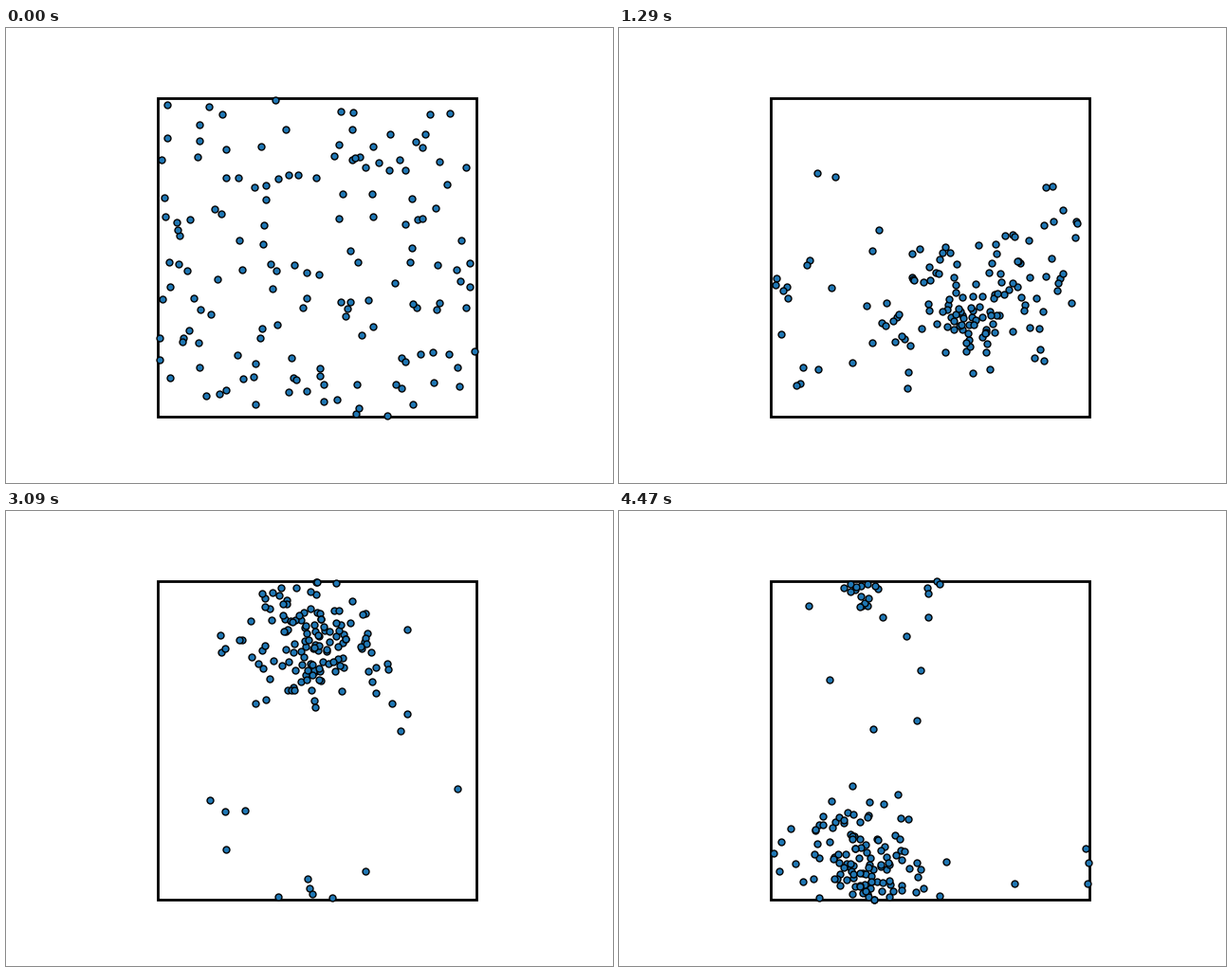
Write a matplotlib script that moves like this. It is 640x480 px and loops after 4500 ms.

```python
import numpy as np
import matplotlib.pyplot as plt
from matplotlib.animation import FuncAnimation

WIDTH, HEIGHT = 640, 480
SIDE = 336
CORNER = np.array([160, 74.4])
COUNT, FOLLOWERS = 150, 105
FRAMES, INTERVAL = 150, 30
SPEED = 6.5      # pixels per frame
RADIUS = 26      # how far a dot sees its neighbours
NOISE = 0.8      # width of the random turn, in radians
REACH = 125      # how far the crowd attracts
SPREAD = 36      # size of the crowd

rng = np.random.default_rng(7)


def shortest(delta):
    """Shortest way across the periodic box."""
    return (delta + SIDE / 2) % SIDE - SIDE / 2


def crowd_route():
    """Centre of the main crowd per frame; it keeps drifting through the walls."""
    times = [0, 16, 43, 61, 87, 119, 149]
    stops = np.array([(270, 205), (195, 228), (395, 280), (355, 368),
                      (248, 130), (415, 130), (275, 378)])
    hops = shortest(np.diff(stops, axis=0))
    stops = stops[0] + np.vstack([[0, 0], np.cumsum(hops, axis=0)])
    frames = np.arange(FRAMES)
    return np.column_stack([np.interp(frames, times, axis) for axis in stops.T])


def unit(v):
    return v / (np.linalg.norm(v, axis=-1, keepdims=True) + 1e-9)


def neighbour_heading(pos, heading):
    gap = shortest(pos[:, None] - pos[None])
    near = (gap ** 2).sum(axis=2) < RADIUS ** 2
    return unit(near @ heading)


def steer(pos, slots, drift):
    """Pull towards a place in the crowd, fading with distance."""
    gap = shortest(slots - pos)
    dist = np.linalg.norm(gap, axis=1, keepdims=True)
    pull = unit(gap) * np.minimum(dist / 25, 1.6) + unit(drift)
    return np.exp(-(dist / REACH) ** 2) * pull


def turn(v, angle):
    c, s = np.cos(angle), np.sin(angle)
    x, y = v.T
    return np.column_stack([c * x - s * y, s * x + c * y])


def simulate():
    route = crowd_route()
    drift = np.gradient(route, axis=0)
    pos = CORNER + rng.uniform(0, SIDE, (COUNT, 2))
    angle = rng.uniform(0, 2 * np.pi, COUNT)
    heading = np.column_stack([np.cos(angle), np.sin(angle)])
    places = rng.normal(0, SPREAD, (FOLLOWERS, 2))
    track = [pos]
    for i in range(1, FRAMES):
        wish = neighbour_heading(pos, heading)
        wish[:FOLLOWERS] += steer(pos[:FOLLOWERS], route[i] + places, drift[i])
        heading = turn(unit(wish), rng.uniform(-NOISE / 2, NOISE / 2, COUNT))
        pos = CORNER + (pos + SPEED * heading - CORNER) % SIDE
        track.append(pos)
    return np.array(track)


track = simulate()

fig = plt.figure(figsize=(WIDTH / 100, HEIGHT / 100), dpi=100, facecolor="white")
ax = fig.add_axes([0, 0, 1, 1])
ax.set(xlim=(0, WIDTH), ylim=(HEIGHT, 0))
ax.axis("off")
ax.add_patch(plt.Rectangle(CORNER, SIDE, SIDE, fill=False, ec="black", lw=2))
dots, = ax.plot([], [], "o", ms=5, mfc="#1f77b4", mec="black", mew=1)


def update(i):
    dots.set_data(track[i, :, 0], track[i, :, 1])
    return dots,


anim = FuncAnimation(fig, update, frames=FRAMES, interval=INTERVAL,
                     repeat=True, repeat_delay=0)
plt.show()
```
